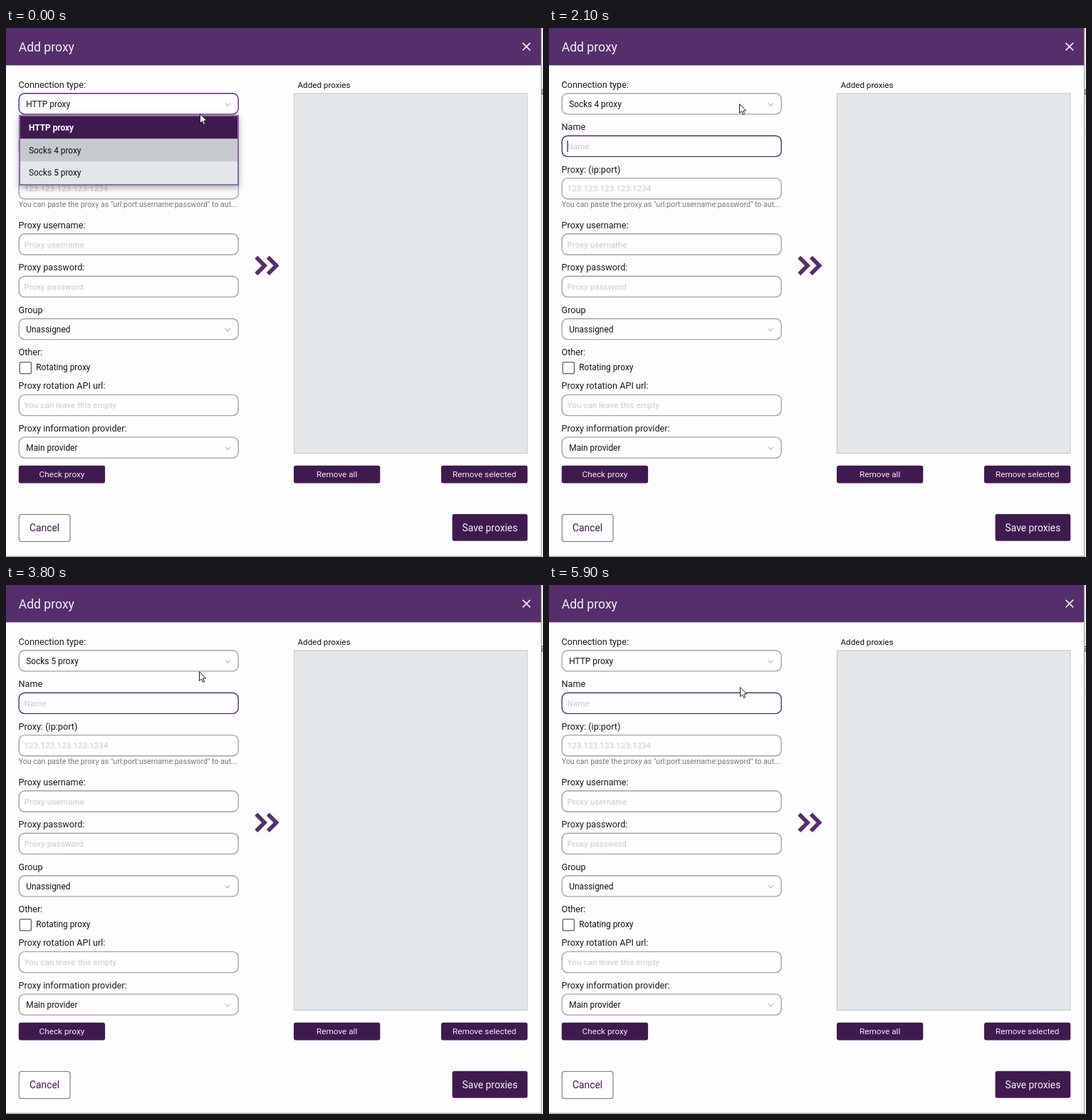
These frames come from a looping animation (754x742 px, 6 s). An HTML page:

```html
<!DOCTYPE html>
<html lang="en">
<head>
<meta charset="utf-8">
<style>
html, body { margin: 0; width: 100%; height: 100%; overflow: hidden; background: #fdfdfd; }
svg { display: block; width: 754px; height: 742px; font-family: Roboto, sans-serif; }
.label { font-size: 12.68px; fill: #1b1b1b; }
.value { font-size: 11.88px; fill: #111; }
.hint { font-size: 11.75px; fill: #c9c9c9; }
.note { font-size: 10.64px; fill: #777; }
.title { font-size: 17.6px; fill: #f4f0f6; }
.small { font-size: 11.78px; fill: #f0ebf2; text-anchor: middle; }
.large { font-size: 13.85px; fill: #f4f0f6; text-anchor: middle; }
.field { fill: #fefefe; stroke: #a3a3a3; stroke-width: 1.4; }
.field.focus { stroke: #562f6c; }
.arrow { fill: none; stroke: #999; stroke-width: 1; }
.button { fill: #3f1a4f; }
</style>
</head>
<body>
<svg viewBox="0 0 754 742">
  <defs>
    <filter id="shadow" x="-10%" y="-10%" width="120%" height="130%">
      <feDropShadow dx="0" dy="4" stdDeviation="4" flood-opacity=".3"/>
    </filter>
    <clipPath id="edge"><path d="M752 0h2v742h-2z"/></clipPath>
  </defs>
  <path fill="#fdfdfd" d="M0 0h754v742H0z"/>
  <path fill="#562e6b" d="M0 0h751v52.3H0z"/>
  <path fill="#999" opacity=".35" d="M0 52.3h751v1H0z"/>
  <path fill="#a9a9a9" d="M751 0h1.5v742h-1.5zM0 740.5h752v1.5H0z"/>
  <path fill="#ccc" d="M752 38h2v1h-2zM752 68h2v1h-2zM752 101h2v1h-2zM752 146h2v1h-2z"/>
  <text class="value" x="750.5" y="93" clip-path="url(#edge)">a</text>
  <path d="M725.5 20.8l10.6 10.6m0-10.6l-10.6 10.6" stroke="#f4f0f6" stroke-width="1.7"/>
  <path d="M351.3 321.4l11.8 11.8-11.8 11.8m16.5-23.6l11.8 11.8-11.8 11.8" fill="none" stroke="#562e6b" stroke-width="5.6"/>
  <rect x="404.5" y="91.8" width="327.5" height="504.7" fill="#e3e7e9" stroke="#c3c8ca"/>
  <rect x="19.3" y="468.8" width="16.2" height="16" rx="2" fill="#fefefe" stroke="#777" stroke-width="1.6"/>
  <g id="form"></g>
  <path id="caret" d="M26 158v16" stroke="#222" stroke-width="1.2"/>
  <g id="menu">
    <rect x="19" y="122.8" width="307" height="97" fill="#e3e7e9" stroke="#8a65a6" stroke-width="2" filter="url(#shadow)"/>
    <g id="rows"></g>
  </g>
  <g id="cursor">
    <path id="pointer" d="M.5 .5v13l3-2.7 2 4.5 2.1-.9-2-4.4h4.1z" fill="#fff" stroke="#222"/>
    <path id="beam" d="M-3 -6.5h2.2l.8.8.8-.8H3M0 -6V6M-3 6.5h2.2l.8-.8.8.8H3" fill="none" stroke="#222"/>
  </g>
</svg>
<script>
const $ = id => document.getElementById(id);

function add(parent, tag, attrs, text = '') {
  const el = document.createElementNS('http://www.w3.org/2000/svg', tag);
  for (const key in attrs) el.setAttribute(key, attrs[key]);
  el.textContent = text;
  parent.append(el);
  return el;
}
const form = $('form');
const write = (cls, x, y, text) => add(form, 'text', { class: cls, x, y }, text);

function field(y, text, select) {
  const box = add(form, 'rect', { class: 'field', x: 18.2, y: y - 14.6, width: 308, height: 29.2, rx: 8 });
  if (select) add(form, 'path', { class: 'arrow', d: `M308 ${y - 1}l3.2 4 3.2-4` });
  const label = write(select ? 'value' : 'hint', select ? 28.3 : 25.5, y + 4.2, text);
  return { box, label };
}

function button(x, y, width, height, text, cls, outline) {
  const rect = add(form, 'rect', { class: 'button', x, y, width, height, rx: 3 });
  const label = write(cls, x + width / 2, y + height / 2 + (cls === 'large' ? 4.9 : 4.2), text);
  if (outline) {
    rect.style.cssText = 'fill:#fefefe;stroke:#8b8391;stroke-width:1.2';
    label.style.fill = '#3f1a4f';
  }
}

write('title', 17.7, 32.8, 'Add proxy');
[['Connection type:', 83.5], ['Name', 143], ['Proxy: (ip:port)', 202.5], ['Proxy username:', 280.5],
  ['Proxy password:', 340], ['Group', 399.5], ['Other:', 459], ['Proxy rotation API url:', 506.3],
  ['Proxy information provider:', 565.8]].forEach(([text, y]) => write('label', 17.5, y, text));
write('value', 42.3, 480.3, 'Rotating proxy');
write('value', 409.5, 83.5, 'Added proxies').style.fontSize = '11.65px';
write('note', 17.7, 251.3, 'You can paste the proxy as "url:port:username:password" to aut...');

const type = field(106.3, '', true);
const name = field(165.8, 'Name');
field(225.2, '123.123.123.123:1234');
field(303.4, 'Proxy username');
field(362.8, 'Proxy password');
field(422.3, 'Unassigned', true);
field(529, 'You can leave this empty');
field(588.5, 'Main provider', true);

button(17.8, 613.8, 121.3, 24.6, 'Check proxy', 'small');
button(404, 613.8, 121.3, 24.6, 'Remove all', 'small');
button(611, 613.8, 121.3, 24.6, 'Remove selected', 'small');
button(18.3, 682.3, 71.7, 38, 'Cancel', 'large', true);
button(626.6, 681.8, 105.7, 37.8, 'Save proxies', 'large');

const options = ['HTTP proxy', 'Socks 4 proxy', 'Socks 5 proxy'];
const rowTop = 123.8, rowHeight = 31.7;
const rows = options.map((text, i) => {
  const y = rowTop + i * rowHeight;
  return {
    box: add($('rows'), 'rect', { x: 20, y, width: 305, height: rowHeight }),
    label: add($('rows'), 'text', { class: 'value', x: 32, y: y + 20 }, text)
  };
});

// Menu sessions: opened, closed, selection while open, selection afterwards.
const sessions = [[0, 800, 0, 1], [2300, 3200, 1, 2], [4100, 4900, 2, 0]];
// Cursor path: time, x, y.
const path = [[-150, 271, 170], [0, 272, 120], [500, 268, 168], [800, 266, 165], [1200, 265, 162],
  [1500, 265, 162], [2000, 267, 106], [2400, 267, 106], [3000, 269, 197], [3300, 269, 199],
  [3800, 271, 121], [4000, 270, 108], [4300, 270, 108], [4700, 269, 142], [5000, 268, 148], [5900, 268, 143]];
const hoverLag = 150, blink = 530;

function cursorAt(t) {
  const i = Math.max(1, path.findIndex(p => p[0] >= t));
  const [t0, x0, y0] = path[i - 1], [t1, x1, y1] = path[i];
  const u = (t - t0) / (t1 - t0), e = u * u * (3 - 2 * u);
  return [x0 + (x1 - x0) * e, y0 + (y1 - y0) * e];
}
const show = (el, on) => el.setAttribute('visibility', on ? 'visible' : 'hidden');

function render(t) {
  const [, closed, before, after] = sessions.filter(s => s[0] <= t).pop();
  const open = t < closed, chosen = open ? before : after;
  const [x, y] = cursorAt(t);
  const hovered = Math.floor((cursorAt(t - hoverLag)[1] - rowTop) / rowHeight);

  type.label.textContent = options[chosen];
  type.box.classList.toggle('focus', open);
  name.box.classList.toggle('focus', !open);
  $('menu').style.display = open ? '' : 'none';
  rows.forEach(({ box, label }, i) => {
    const on = i === chosen;
    box.style.fill = on ? '#3f1a4f' : i === hovered ? '#c5cbcc' : '#e3e7e9';
    label.style.fill = on ? '#fff' : '#111';
    label.style.fontWeight = on ? 700 : 400;
  });
  show($('caret'), !open && (t - closed) % (2 * blink) < blink);

  const overText = !open && y > 151 && y < 181;
  show($('beam'), overText);
  show($('pointer'), !overText);
  $('cursor').setAttribute('transform', `translate(${Math.round(x)} ${Math.round(y)})`);
}

const start = performance.now();
function tick() {
  const t = (performance.now() - start) % 6000;
  render(Math.floor(t / 100) * 100);
  requestAnimationFrame(tick);
}
tick();
</script>
</body>
</html>
```
